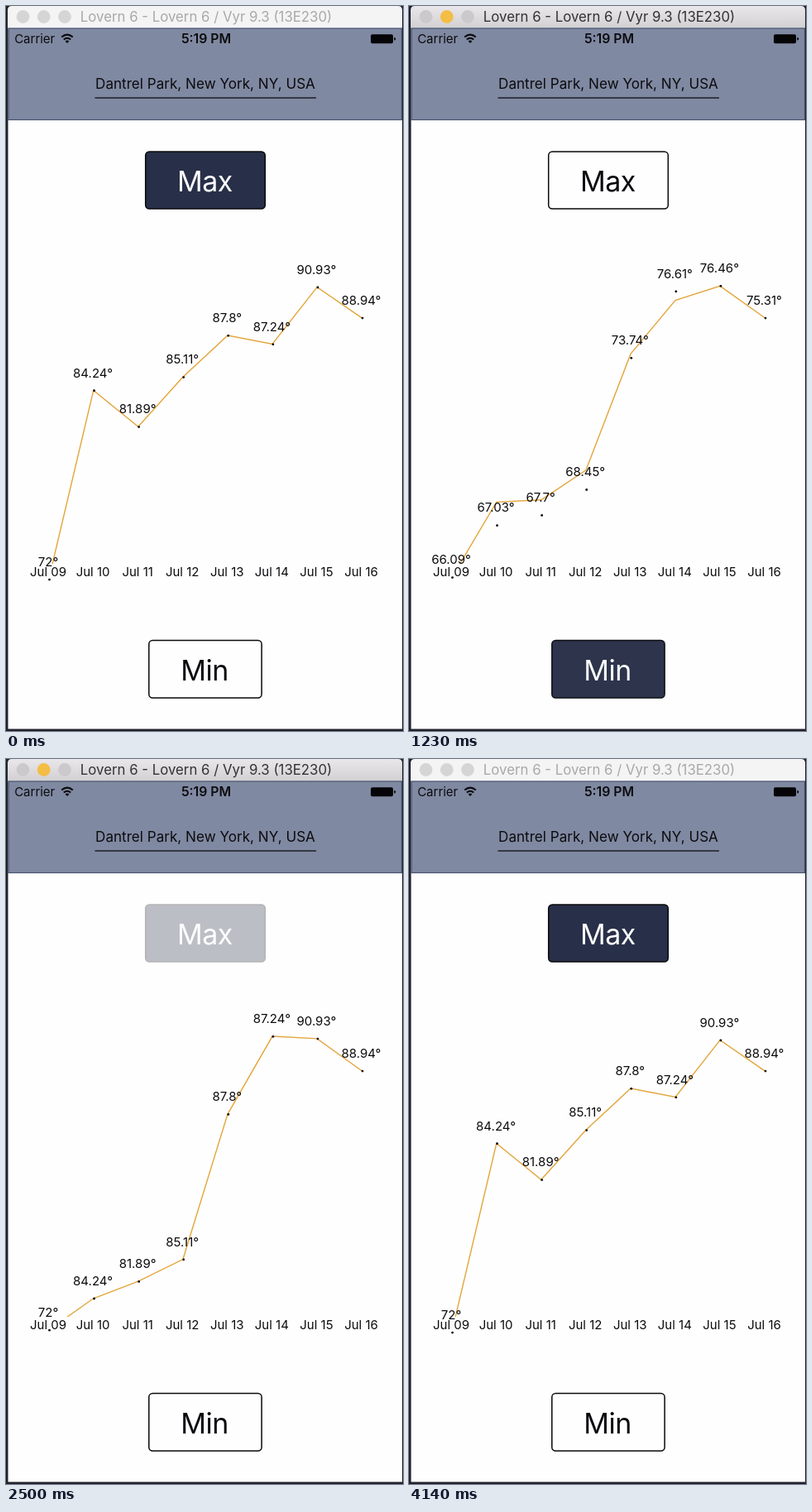
These frames come from a looping animation (480 by 876 pixels, 4190 ms). An HTML page:

```html
<!DOCTYPE html>
<html lang="en">
<head>
<meta charset="utf-8">
<title>Temperature chart</title>
<style>
  html, body { margin: 0; width: 100%; height: 100%; overflow: hidden; background: #20212b; }
  svg { display: block; width: 480px; height: 876px; font: 15px Inter, "Open Sans", sans-serif; }
  text { text-anchor: middle; fill: #0c0c0e; }
  .bar { fill: #f5f4f5; }
  .light { fill: #d6d5d6; }
  .title { font-size: 16.8px; fill: #a9a8a9; }
  .active .bar { fill: url(#chrome); }
  .active .light { fill: #cbc9cb; }
  .active .amber { fill: #f4bd46; }
  .active .title { fill: #333233; }
  .button rect { fill: #fefefe; stroke: #08090d; stroke-width: 1.5; }
  .button text { font-size: 34px; letter-spacing: -.5px; fill: #08090d; }
  .button.on rect { fill: #282f48; }
  .button.on text { fill: #fefefe; }
</style>
</head>
<body>
<svg viewBox="0 0 480 876">
  <defs>
    <linearGradient id="chrome" x2="0" y2="1">
      <stop stop-color="#e9e7e9"/><stop offset="1" stop-color="#d2d0d2"/>
    </linearGradient>
    <clipPath id="plot"><rect y="290" width="480" height="384"/></clipPath>
  </defs>

  <rect width="480" height="876" fill="#20212b"/>
  <rect x="2.5" y="26" width="476.5" height="847.5" fill="#fefefe"/>

  <g id="window">
    <path class="bar" d="M2 27V5q0-5 5-5H474q5 0 5 5V27z"/>
    <circle class="light" cx="20.5" cy="13" r="7.9"/>
    <circle class="light amber" cx="45.7" cy="13" r="7.9"/>
    <circle class="light" cx="71" cy="13" r="7.9"/>
    <text class="title" x="242" y="19">Lovern 6 - Lovern 6 / Vyr 9.3 (13E230)</text>
  </g>

  <rect x="3" y="27" width="475.5" height="110.5" fill="#8089a2" stroke="#46536f" stroke-width="1.2"/>
  <text x="34.7" y="45.3">Carrier</text>
  <g fill="none" stroke="#0c0c0e" stroke-width="2">
    <path d="M67.2 37.6q6.8-6 13.6 0M69.8 40.6q4.2-3.6 8.4 0"/>
    <path d="M74 45l-2.4-2.5q2.4-1.8 4.8 0z" fill="#0c0c0e" stroke="none"/>
  </g>
  <text x="242" y="45.3" font-size="15.8" font-weight="600">5:19 PM</text>
  <rect x="441" y="34.2" width="27" height="11" rx="2" fill="#050507"/>
  <path d="M469.3 37.8q2 .5 2 2t-2 2z" fill="#050507"/>
  <text x="241" y="99.7" font-size="17.1">Dantrel Park, New York, NY, USA</text>
  <path d="M107.5 111H375" stroke="#1b1e26" stroke-width="1.3"/>

  <g class="button" id="max">
    <rect x="168.7" y="176" width="144.6" height="69" rx="4.5"/>
    <text x="240.5" y="223.6">Max</text>
  </g>
  <g class="button" id="min">
    <rect x="172.8" y="766.4" width="136.3" height="69.6" rx="4.5"/>
    <text x="240" y="814.6">Min</text>
  </g>

  <polyline id="line" clip-path="url(#plot)" fill="none" stroke="#e3a53c" stroke-width="1.4"/>
  <g id="marks"></g>
</svg>

<script>
const LOOP = 4190, FPS = 22;
const ACTIVE_FROM = 905, ACTIVE_TO = 4000;
const TO_MIN = 1010, TO_MAX = 2462;

const series = {
  max: { values: [72, 84.24, 81.89, 85.11, 87.8, 87.24, 90.93, 88.94], scale: 18.65 },
  min: { values: [66.09, 67.03, 67.7, 68.45, 73.74, 76.61, 76.46, 75.31], scale: 33.95 }
};
for (const s of Object.values(series))
  s.ys = s.values.map(v => 377.1 - (v - s.values[7]) * s.scale);

const $ = id => document.getElementById(id);
const clamp = v => Math.min(1, Math.max(0, v));
const mix = (a, b, p) => a + (b - a) * p;
const labelX = i => 51 + 54.07 * i;
const dotX = i => labelX(i) + 1.5;
const lineX = i => labelX(i) + .7;

function add(tag, attrs, text = "") {
  const el = document.createElementNS("http://www.w3.org/2000/svg", tag);
  for (const k in attrs) el.setAttribute(k, attrs[k]);
  el.textContent = text;
  return $("marks").appendChild(el);
}

const marks = series.max.values.map((_, i) => {
  add("text", { x: labelX(i), y: 689 }, "Jul " + String(9 + i).padStart(2, "0"));
  return {
    label: add("text", { x: labelX(i) }),
    dot: add("circle", { cx: dotX(i), r: 1.4, fill: "#08080a" })
  };
});

// cubic-bezier(.42, 0, .58, 1)
function easeInOut(x) {
  let lo = 0, hi = 1, s = .5;
  for (let i = 0; i < 20; i++) {
    s = (lo + hi) / 2;
    const r = 1 - s;
    if (1.26 * s * r * r + 1.74 * s * s * r + s ** 3 < x) lo = s; else hi = s;
  }
  return s * s * (3 - 2 * s);
}
const quadInOut = x => x < .5 ? 2 * x * x : 1 - 2 * (1 - x) ** 2;

// critically damped spring
function settle(ms) {
  const w = .012 * Math.max(0, ms);
  return 1 - (1 + w) * Math.exp(-w);
}

// dims before the tap registers, then recovers
function tapOpacity(ms, recover) {
  return ms < 0
    ? mix(1, .2, quadInOut(clamp((ms + 100) / 100)))
    : mix(.2, 1, quadInOut(clamp(ms / recover)));
}

function render(t) {
  const shown = t >= TO_MIN && t < TO_MAX ? "min" : "max";
  const start = t < TO_MIN ? -LOOP : shown === "min" ? TO_MIN : TO_MAX;
  const to = series[shown], from = series[shown === "min" ? "max" : "min"];
  const labelP = easeInOut(clamp((t - start) / 300));
  const lineP = settle(t - start - 15);

  $("window").classList.toggle("active", t >= ACTIVE_FROM && t < ACTIVE_TO);
  for (const id of ["max", "min"]) $(id).classList.toggle("on", id === shown);
  $("min").style.opacity = tapOpacity(t - TO_MIN, 250);
  $("max").style.opacity = tapOpacity(t - TO_MAX, 150);

  marks.forEach(({ label, dot }, i) => {
    const y = mix(from.ys[i], to.ys[i], labelP);
    label.textContent = to.values[i] + "°";
    label.setAttribute("y", y - 16.2);
    dot.setAttribute("cy", y);
  });
  $("line").setAttribute("points",
    to.ys.map((y, i) => [lineX(i), mix(from.ys[i], y, lineP) - .3]).join(" "));
}

function tick() {
  const t = performance.now() % LOOP;
  render(Math.floor((t + 5) * FPS / 1000) * 1000 / FPS);
  requestAnimationFrame(tick);
}
tick();
</script>
</body>
</html>
```
